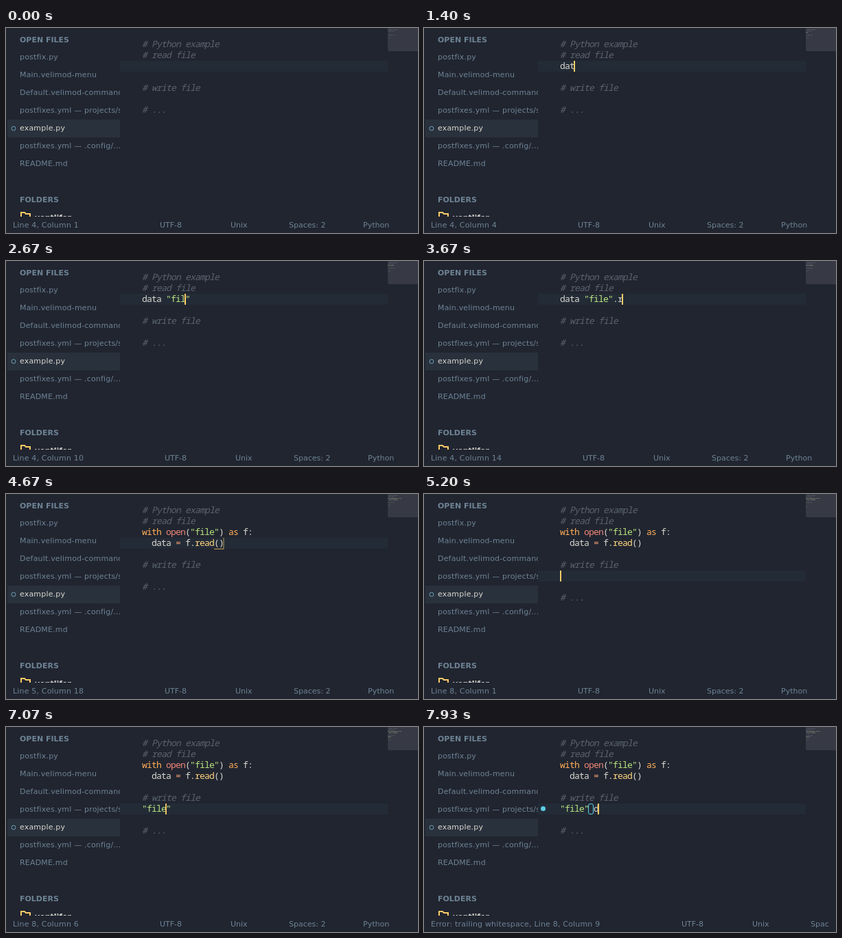
These frames come from a looping animation (600x300 px, 8000 ms). An HTML page:

```html
<!DOCTYPE html>
<html lang="en">
<head>
<meta charset="utf-8">
<title>Editor typing</title>
<style>
html, body { margin: 0; width: 100%; height: 100%; overflow: hidden; background: #212530; }
#stage { position: relative; width: 600px; height: 300px; overflow: hidden; background: #212530;
  font: 11px/14px "DejaVu Sans", sans-serif; color: #6d8394; white-space: pre; }
#stage div, #stage i, #stage svg { position: absolute; }
#side { left: 0; top: 0; width: 166px; height: 276px; overflow: hidden; }
#side div { left: 20px; }
#side, #label { letter-spacing: 0.18px; }
#side b { font-weight: bold; letter-spacing: 0; }
#side .row { left: 2px; top: 134px; width: 164px; height: 26px; background: #29313c; }
#side .on { color: #d9d7ce; }
#line { left: 166px; width: 390px; height: 16px; background: #232b37; }
#code { left: 198px; top: -1px; color: #d9d7ce;
  font: 13px/16px "Noto Sans Mono", "DejaVu Sans Mono", monospace; font-stretch: 87.5%; }
.c { color: #5a636f; font-style: italic; }
.s { color: #bae67e; }
.k { color: #ffae57; }
.o { color: #f28779; }
.e { color: #f29e74; }
.r { color: #ffd57f; }
#caret { width: 2px; height: 16px; background: #ffcc66; }
#pair { left: 303px; top: 80px; width: 14px; height: 1px; background: #c99f52; }
#mark { width: 6px; height: 14px; border: 1px solid #5ccfe6; border-radius: 3px; }
#dot { left: 170px; width: 7px; height: 7px; border-radius: 50%; background: #5ccfe6; }
#map { left: 556px; top: 0; width: 44px; height: 34px; background: #373a44; border-radius: 0 0 0 2px; }
#map i { height: 1px; background: #6e7266; }
#map .dim { background: #4d525c; }
#status { left: 10px; top: 282px; width: 580px; height: 14px; overflow: hidden; }
#info div { top: 0; }
</style>
</head>
<body>
<div id="stage">
  <div id="side"></div>
  <div id="line"></div>
  <div id="mark"></div>
  <div id="dot"></div>
  <div id="code"></div>
  <div id="pair"></div>
  <div id="caret"></div>
  <div id="map"></div>
  <div id="status"><div id="label"></div><div id="info"></div></div>
</div>
<script>
const $ = id => document.getElementById(id);
const LOOP = 8000, CELL = 7, ROW = 16, LEFT = 198, EXPAND = 4200, ENTER = 5200;

// time, caret line, caret column, text being typed
const keys = [
  [-1000, 4, 0, ''],
  [1270, 4, 1, 'd'], [1330, 4, 2, 'da'], [1400, 4, 3, 'dat'], [1470, 4, 4, 'data'],
  [1870, 4, 5, 'data '], [2330, 4, 6, 'data ""'],
  [2530, 4, 7, 'data "f"'], [2600, 4, 8, 'data "fi"'],
  [2670, 4, 9, 'data "fil"'], [2800, 4, 10, 'data "file"'],
  [3400, 4, 11, 'data "file"'], [3470, 4, 12, 'data "file".'],
  [3670, 4, 13, 'data "file".r'], [3800, 4, 14, 'data "file".re'],
  [3870, 4, 15, 'data "file".rea'], [4000, 4, 16, 'data "file".read'],
  [EXPAND, 5, 17, ''], [4800, 6, 0, ''], [5000, 7, 12, ''], [ENTER, 8, 0, ''],
  [5800, 8, 1, '""'], [6130, 8, 2, '"f"'], [6200, 8, 3, '"fi"'],
  [6330, 8, 4, '"fil"'], [6400, 8, 5, '"file"'], [7130, 8, 6, '"file"'],
  [7400, 8, 7, '"file" '], [7930, 8, 8, '"file" d']
];
// time, caret target opacity
const fades = [
  [-400, 0], [330, 1], [800, 0], [1130, 1], [1800, 0], [2200, 0], [3070, 0],
  [4530, 0], [5530, 0], [6600, 0], [6930, 1], [7730, 0]
];
const fadeSteps = [0.9, 0.65, 0.35, 0];
// start, end, column of the stray space
const errors = [[2270, 2530, 4], [7800, LOOP, 6]];

const last = (list, t) => list.filter(e => e[0] <= t).pop();

function linesAt(t, text) {
  const first = t < EXPAND ? [text] : ['with open("file") as f:', '  data = f.read()'];
  const second = t < ENTER ? [] : [text];
  return ['', '# Python example', '# read file', ...first, '', '# write file', ...second, '', '# ...'];
}

function paint(src) {
  const rule = /(#.*)|("[^"]*"?)|\b(with|as)\b|\b(open)\b|(=)|(read(?=\())/g;
  return src.replace(rule, (m, ...g) => `<span class="${'cskoer'[g.findIndex((x, i) => i < 6 && x)]}">${m}</span>`);
}

function drawMap(lines) {
  let html = '';
  lines.forEach((s, n) => {
    const cls = s[0] === '#' ? 'dim' : '';
    for (const m of s.matchAll(/\S+/g))
      html += `<i class="${cls}" style="left:${m.index * 0.85}px;top:${n * 2}px;width:${m[0].length * 0.85}px"></i>`;
  });
  $('map').innerHTML = html;
}

function buildSide() {
  const files = ['postfix.py', 'Main.velimod-menu', 'Default.velimod-commands',
    'postfixes.yml — projects/settings', 'example.py', 'postfixes.yml — .config/...', 'README.md'];
  const at = (y, s, cls = '') => `<div class="${cls}" style="top:${y}px">${s}</div>`;
  $('side').innerHTML = '<div class="row"></div>' + at(11, '<b>OPEN FILES</b>') +
    files.map((f, i) => at(36 + 26 * i, f, i === 4 ? 'on' : '')).join('') +
    at(245, '<b>FOLDERS</b>') +
    '<div class="on" style="left:42px;top:271px"><b>ventlifer</b></div>' +
    '<svg width="40" height="276" style="left:0;top:0" fill="none">' +
    '<circle cx="11" cy="147" r="3" stroke="#6a9fb5"/>' +
    '<path d="M22 280V270H27L29 272H35V280" stroke="#ffcc66" stroke-width="2"/></svg>';
  $('info').innerHTML = [['UTF-8', 0], ['Unix', 103], ['Spaces: 2', 188], ['Python', 296]]
    .map(([s, x]) => `<div style="left:${x}px">${s}</div>`).join('');
}

// put the monospaced text on the 7px grid
function fitGrid() {
  const code = $('code');
  code.textContent = '0'.repeat(100);
  code.style.letterSpacing = CELL - code.getBoundingClientRect().width / 100 + 'px';
}

function caretAlpha(t, keyTime) {
  const [start, target] = last(fades, t);
  if (keyTime > start) return 1;
  const i = Math.min(3, Math.floor((t - start) / 65));
  return target ? (fadeSteps[2 - i] ?? 1) : fadeSteps[i];
}

let shown = '';
function draw(t) {
  const [time, line, col, text] = last(keys, t);
  const err = errors.find(e => t >= e[0] && t < e[1]);
  $('caret').style.opacity = caretAlpha(t, time);

  const id = time + '|' + !!err;
  if (id === shown) return;
  shown = id;

  const y = (line - 1) * ROW, lines = linesAt(t, text);
  $('code').innerHTML = lines.map(paint).join('\n');
  drawMap(lines);
  $('line').style.top = y + 'px';
  $('caret').style.top = y + 'px';
  $('caret').style.left = Math.max(LEFT, LEFT - 1 + CELL * col) + 'px';
  $('pair').style.display = line === 5 ? '' : 'none';

  for (const el of [$('mark'), $('dot')]) el.style.display = err ? '' : 'none';
  $('mark').style.top = y + 'px';
  $('dot').style.top = y + 4 + 'px';
  if (err) $('mark').style.left = LEFT - 1 + CELL * err[2] + 'px';

  $('label').textContent = (err ? 'Error: trailing whitespace, ' : '') + `Line ${line}, Column ${col + 1}`;
  $('info').style.left = 207 + 7 * String(col + 1).length + (err ? 151 : 0) + 'px';
}

buildSide();
fitGrid();
const begin = performance.now();
function tick() {
  draw(Math.min(LOOP - 1, (performance.now() - begin) % LOOP + 4));
  requestAnimationFrame(tick);
}
tick();
</script>
</body>
</html>
```
